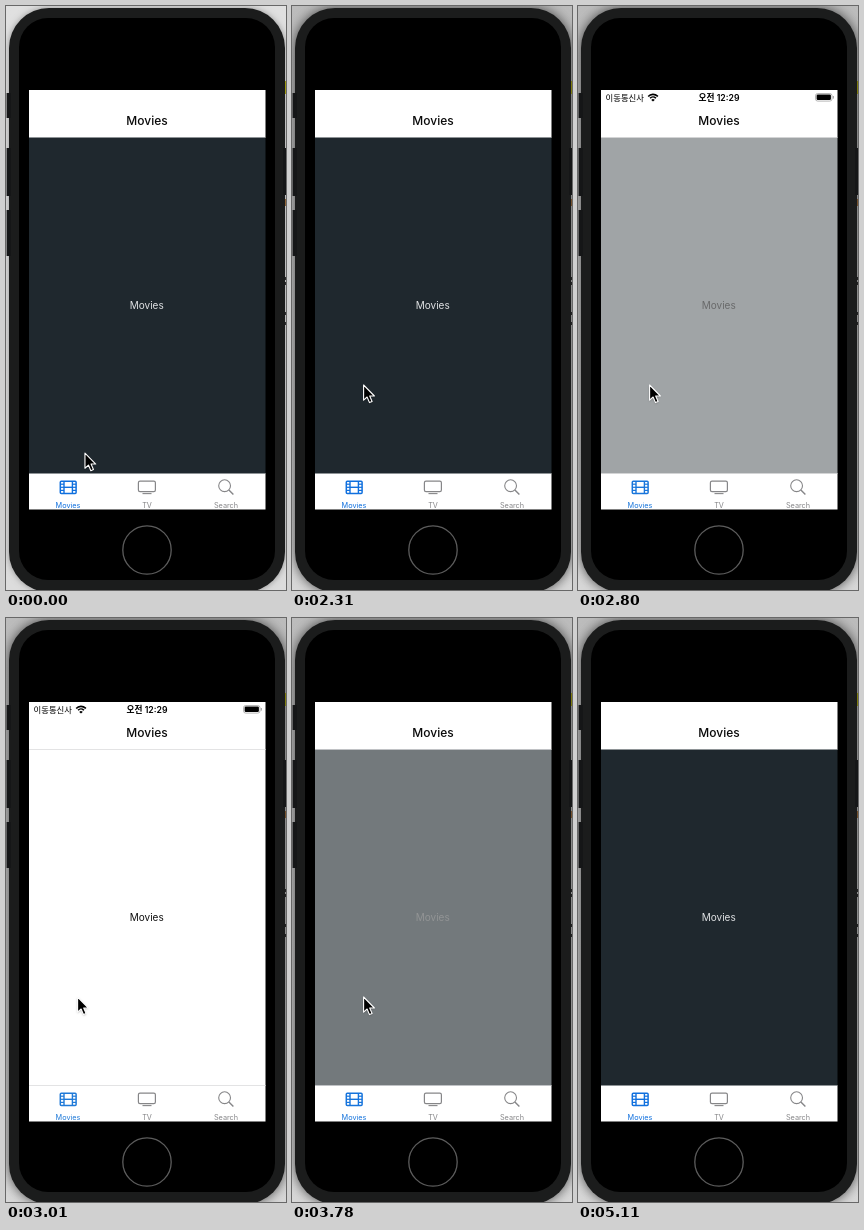
Animation, 280 px wide and 584 px high, one loop 5.32 s. Source, as an HTML page with a canvas:

```html
<!DOCTYPE html>
<html lang="ko">
<head>
<meta charset="utf-8">
<title>Movies</title>
<style>
html, body { margin: 0; width: 100%; height: 100%; overflow: hidden; background: #000; }
canvas { display: block; width: 280px; height: 584px; }
</style>
</head>
<body>
<canvas id="stage"></canvas>
<script>
const W = 280, H = 584, LOOP = 5320;
const FONT = 'Inter, "Noto Sans CJK KR", "Noto Sans CJK", sans-serif';
const canvas = document.getElementById('stage');
const ctx = canvas.getContext('2d');
const ratio = window.devicePixelRatio || 1;
canvas.width = W * ratio;
canvas.height = H * ratio;
ctx.scale(ratio, ratio);

const FADE = 450, TO_LIGHT = 2553, TO_DARK = 3518, FOCUS = 280;
const DARK = [31, 40, 46], LIGHT = [255, 255, 255];

// time, x, y of the pointer tip
const POINTER = [
  [0, 79, 447], [70, 76, 452], [350, 50, 483], [700, 50, 483],
  [770, 64, 420], [840, 82, 358], [910, 71.6, 379], [4060, 71.6, 379],
  [4130, 84, 404], [4200, 108, 458], [4270, 118, 486], [4340, 118, 486],
  [4410, 120, 496], [4690, 129, 570], [4830, 130, 576], [5040, 131, 590],
  [LOOP, 131, 590]
];

const clamp = v => Math.min(1, Math.max(0, v));
const smooth = v => { v = clamp(v); return v * v * (3 - 2 * v); };
const lerp = (a, b, k) => a + (b - a) * k;
const mix = (a, b, k) => `rgb(${a.map((v, i) => Math.round(lerp(v, b[i], k)))})`;

function pointerAt(t) {
  let i = 0;
  while (i < POINTER.length - 2 && t >= POINTER[i + 1][0]) i++;
  const [t0, x0, y0] = POINTER[i], [t1, x1, y1] = POINTER[i + 1];
  const k = clamp((t - t0) / (t1 - t0));
  return [lerp(x0, x1, k), lerp(y0, y1, k)];
}

function rect(x, y, w, h, color) {
  ctx.fillStyle = color;
  ctx.fillRect(x, y, w, h);
}

function round(x, y, w, h, r) {
  ctx.beginPath();
  ctx.roundRect(x, y, w, h, r);
}

function text(str, x, y, size, color, weight = 400, align = 'center') {
  ctx.font = `${weight} ${size}px ${FONT}`;
  ctx.textAlign = align;
  ctx.fillStyle = color;
  ctx.fillText(str, x, y);
}

function line(color, width, ...pts) {
  ctx.strokeStyle = color;
  ctx.lineWidth = width;
  ctx.beginPath();
  pts.forEach(([x, y]) => ctx.lineTo(x, y));
  ctx.stroke();
}

function drawDesktop(focused) {
  const g = ctx.createLinearGradient(0, 0, 0, H);
  const tones = focused ? ['#bcbcbc', '#d8d8d8'] : ['#e0e0e0', '#dcdcdc'];
  tones.forEach((c, i) => g.addColorStop(i, c));
  rect(0, 0, W, H, g);
  rect(278, 75, 2, 13, '#b9b414');
  rect(278, 193, 2, 7, '#a9753f');
  for (const y of [271, 276, 306, 316]) rect(278.5, y, 1.5, 3, '#333');
}

function drawPhone(focused) {
  ctx.save();
  ctx.shadowColor = `rgba(0,0,0,${focused ? 0.65 : 0.35})`;
  ctx.shadowBlur = (focused ? 12 : 6) * ratio;
  round(3, 2, 276, 584, 40);
  ctx.fillStyle = '#1b1c1c';
  ctx.fill();
  ctx.restore();
  for (const [y, h] of [[87, 25], [142, 48], [204, 46]]) rect(0.6, y, 4.4, h, '#151617');
  rect(277, 142, 3, 47, '#151617');
  round(13, 12, 256, 562, 29);
  ctx.fillStyle = '#000';
  ctx.fill();
  ctx.strokeStyle = '#5c5c5c';
  ctx.lineWidth = 1.3;
  ctx.beginPath();
  ctx.arc(141, 544, 24.2, 0, Math.PI * 2);
  ctx.stroke();
}

function drawStatus(alpha) {
  if (alpha <= 0) return;
  ctx.save();
  ctx.globalAlpha = alpha;
  text('이동통신사', 27.5, 95, 8.4, '#000', 400, 'left');
  text('오전 12:29', 141, 95, 8.7, '#000', 600);
  ctx.strokeStyle = '#000';
  ctx.lineWidth = 1.6;
  for (const r of [4, 6.6]) {
    ctx.beginPath();
    ctx.arc(75, 95, r, -Math.PI * 0.76, -Math.PI * 0.24);
    ctx.stroke();
  }
  ctx.fillStyle = '#000';
  ctx.beginPath();
  ctx.moveTo(75, 95.6);
  ctx.arc(75, 95.6, 2.4, -Math.PI * 0.76, -Math.PI * 0.24);
  ctx.fill();
  round(237.5, 87.5, 16.5, 7.6, 2.2);
  ctx.strokeStyle = '#999';
  ctx.lineWidth = 0.7;
  ctx.stroke();
  round(238.6, 88.6, 14.3, 5.4, 1.2);
  ctx.fill();
  rect(254.8, 90, 1, 2.6, '#999');
  ctx.restore();
}

function drawTabs(light) {
  const blue = mix([16, 112, 222], [32, 122, 216], light);
  const gray = '#868688';
  ctx.strokeStyle = blue;
  ctx.lineWidth = 1.5;
  round(54.3, 475.2, 15.8, 12.2, 1);
  ctx.stroke();
  line(blue, 1.4, [58, 475], [58, 487.5]);
  line(blue, 1.4, [66.4, 475], [66.4, 487.5]);
  line(blue, 1.4, [58, 481.3], [66.4, 481.3]);
  for (const y of [478.2, 481.3, 484.4]) {
    line(blue, 1.2, [54.5, y], [58, y]);
    line(blue, 1.2, [66.4, y], [70.1, y]);
  }
  ctx.strokeStyle = gray;
  ctx.lineWidth = 1.2;
  round(132.4, 475.1, 17, 10.6, 1.6);
  ctx.stroke();
  line(gray, 1.1, [136.5, 487.6], [145.5, 487.6]);
  ctx.beginPath();
  ctx.arc(218.6, 479.7, 5.9, 0, Math.PI * 2);
  ctx.stroke();
  line(gray, 1.4, [222.9, 484], [227.4, 488.5]);
  text('Movies', 62, 501.6, 7.3, blue);
  text('TV', 141, 501.6, 7.3, gray);
  text('Search', 220, 501.6, 7.3, gray);
}

function drawScreen(light) {
  rect(23, 84, 236.5, 48, '#fff');
  rect(23, 467, 236.5, 36.5, '#fff');
  rect(23, 131.5, 236.5, 336, mix(DARK, LIGHT, light));
  rect(23, 131, 236.5, 0.7, `rgba(215,215,217,${light})`);
  rect(23, 467, 236.5, 0.7, `rgba(215,215,217,${light})`);
  text('Movies', 141, 119.2, 12, '#0a0a0a', 500);
  text('Movies', 140.7, 302.6, 10, mix([225, 227, 229], [15, 15, 15], light));
  drawStatus(clamp((light - 0.4) / 0.15));
  drawTabs(light);
}

function drawPointer(x, y) {
  ctx.save();
  ctx.translate(x, y);
  ctx.beginPath();
  [[0, 0], [0, 15.2], [3.5, 12], [5.9, 17.6], [8.5, 16.5], [6.1, 11], [10.8, 11]]
    .forEach(([px, py]) => ctx.lineTo(px, py));
  ctx.closePath();
  ctx.shadowColor = 'rgba(0,0,0,0.35)';
  ctx.shadowBlur = 2 * ratio;
  ctx.shadowOffsetY = ratio;
  ctx.fillStyle = '#000';
  ctx.fill();
  ctx.shadowColor = 'transparent';
  ctx.strokeStyle = '#fff';
  ctx.lineWidth = 1.1;
  ctx.lineJoin = 'round';
  ctx.stroke();
  ctx.restore();
}

function draw(t) {
  const light = smooth((t - TO_LIGHT) / FADE) - smooth((t - TO_DARK) / FADE);
  const focused = t >= FOCUS;
  drawDesktop(focused);
  drawPhone(focused);
  drawScreen(light);
  drawPointer(...pointerAt(t));
}

const start = performance.now();
function tick(now) {
  draw(Math.max(0, now - start) % LOOP);
  requestAnimationFrame(tick);
}
draw(0);
requestAnimationFrame(tick);
</script>
</body>
</html>
```
